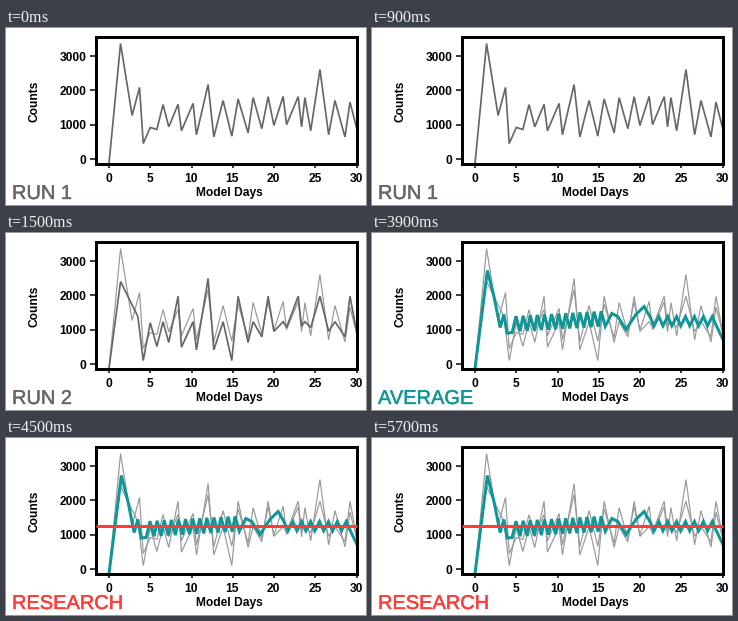
Write a matplotlib script that moves like this. It is 360 px wide and 177 px high and loops after 6.5 s.

```python
from math import cos, tau

import matplotlib.pyplot as plt
from matplotlib.animation import FuncAnimation
from matplotlib.patches import Rectangle
from matplotlib.patheffects import withStroke

WIDTH, HEIGHT, DPI = 360, 177, 100
PX = 72 / DPI
GREY, PALE, TEAL, RED = "#666666", "#999999", "#0f9697", "#ff3b37"
START = (0, -130)


def stage_x(days):
    return 103 + 8.25 * days


def stage_y(counts):
    return 131 - 0.0344 * counts


def wave(mean, swing, low, period):
    """Slow cosine over the tooth index, lowest at `low`."""
    return lambda k: mean - swing * cos(tau * (k - low) / period)


def zigzag(peak, trough, extremes):
    """Fourteen irregular teeth; both runs share the same sample days."""
    gap = wave(0.79, 0.42, 1.5, 7)
    for k in range(14):
        day = 6.55 + 1.82 * k - (k > 9)
        yield day, extremes.get((k, "peak"), peak(k))
        yield day + gap(k), extremes.get((k, "trough"), trough(k))


def ripple(first, pitch, teeth, peak, trough, rise=0):
    """Even teeth that drift upwards by `rise` counts each."""
    for k in range(teeth):
        yield first + pitch * k, peak + rise * k
        yield first + pitch * k + 0.5, trough + rise * k


RUN_1 = [
    START, (1.4, 3355), (2.8, 1265), (3.7, 2080), (4.15, 450), (5, 915),
    (5.8, 860),
    *zigzag(wave(1700, 120, 0, 16), wave(820, 180, 3.25, 9),
            {(3, "peak"): 2165, (11, "peak"): 2600}),
]
RUN_2 = [
    START, (1.4, 2400), (3.5, 1380), (4.15, 100), (5, 1200), (5.8, 510),
    *zigzag(wave(1600, 370, 0, 2), wave(750, 350, 2.5, 13),
            {(3, "peak"): 2485, (4, "trough"): 100}),
]
AVERAGE = [
    START, (1.5, 2718), (2.3, 1960), (3.05, 1060), (3.5, 1440), (3.9, 900),
    (4.5, 915),
    *ripple(4.97, 0.86, 13, 1390, 950, rise=12),
    (16.6, 1470), (17.3, 1380), (18.3, 1000), (19.5, 1440), (20.5, 1670),
    *ripple(21.2, 1.08, 8, 1380, 1110),
    (30, 740),
]

plt.rcParams["font.family"] = "Liberation Sans"
fig = plt.figure(figsize=(WIDTH / DPI, HEIGHT / DPI), dpi=DPI, facecolor="white")
ax = fig.add_axes([0, 0, 1, 1])
ax.set(xlim=(0, WIDTH), ylim=(HEIGHT, 0))
ax.axis("off")


def label(x, y, text, **options):
    style = dict(size=12 * PX, weight="bold", ha="center", va="baseline")
    return ax.text(x, y, text, **(style | options))


def stroke(points, color, width, **options):
    line, = ax.plot(*zip(*points), color=color, lw=width * PX, **options)
    return line


plot_area = Rectangle((89.5, 8.5), 261, 127, fill=False, ec="black",
                      lw=3 * PX, joinstyle="miter", zorder=5)
ax.add_patch(plot_area)


def series(data, color, width, zorder):
    points = [(stage_x(days), stage_y(counts)) for days, counts in data]
    line = stroke(points, color, width, zorder=zorder, solid_joinstyle="miter")
    line.set_clip_path(plot_area)
    return line


for days in range(0, 31, 5):
    x = stage_x(days)
    stroke([(x, 136), (x, 140)], "black", 1.5, solid_capstyle="butt")
    label(x - 0.4, 154.3, str(days))
for counts in range(0, 4000, 1000):
    y = stage_y(counts)
    stroke([(84, y), (89, y)], "black", 1.5, solid_capstyle="butt")
    label(80.3, y + 4.8, str(counts), ha="right")
label(223.5, 168, "Model Days")
label(28, 73, "Counts", rotation=90, va="center")

run_1 = series(RUN_1, GREY, 1.7, zorder=2)
run_2 = series(RUN_2, GREY, 1.7, zorder=3)
average = series(AVERAGE, TEAL, 3, zorder=4)
research = stroke([(90, 88), (351, 88)], RED, 3, zorder=6,
                  solid_capstyle="butt")
caption = label(6, 171, "", size=20 * PX, weight="normal", ha="left")

STAGES = [("RUN 1", GREY), ("RUN 2", GREY), ("AVERAGE", TEAL), ("RESEARCH", RED)]


def fade(line, faded):
    line.set_color(PALE if faded else GREY)
    line.set_linewidth((1.2 if faded else 1.7) * PX)


def draw(frame):
    stage = min(frame // 3, 3)
    fade(run_1, stage > 0)
    fade(run_2, stage > 1)
    for step, line in enumerate((run_1, run_2, average, research)):
        line.set_visible(stage >= step)
    text, color = STAGES[stage]
    caption.set(text=text, color=color,
                path_effects=[withStroke(linewidth=0.3, foreground=color)])
    return run_1, run_2, average, research, caption


anim = FuncAnimation(fig, draw, frames=13, interval=500, repeat=True,
                     repeat_delay=0)
plt.show()
```
